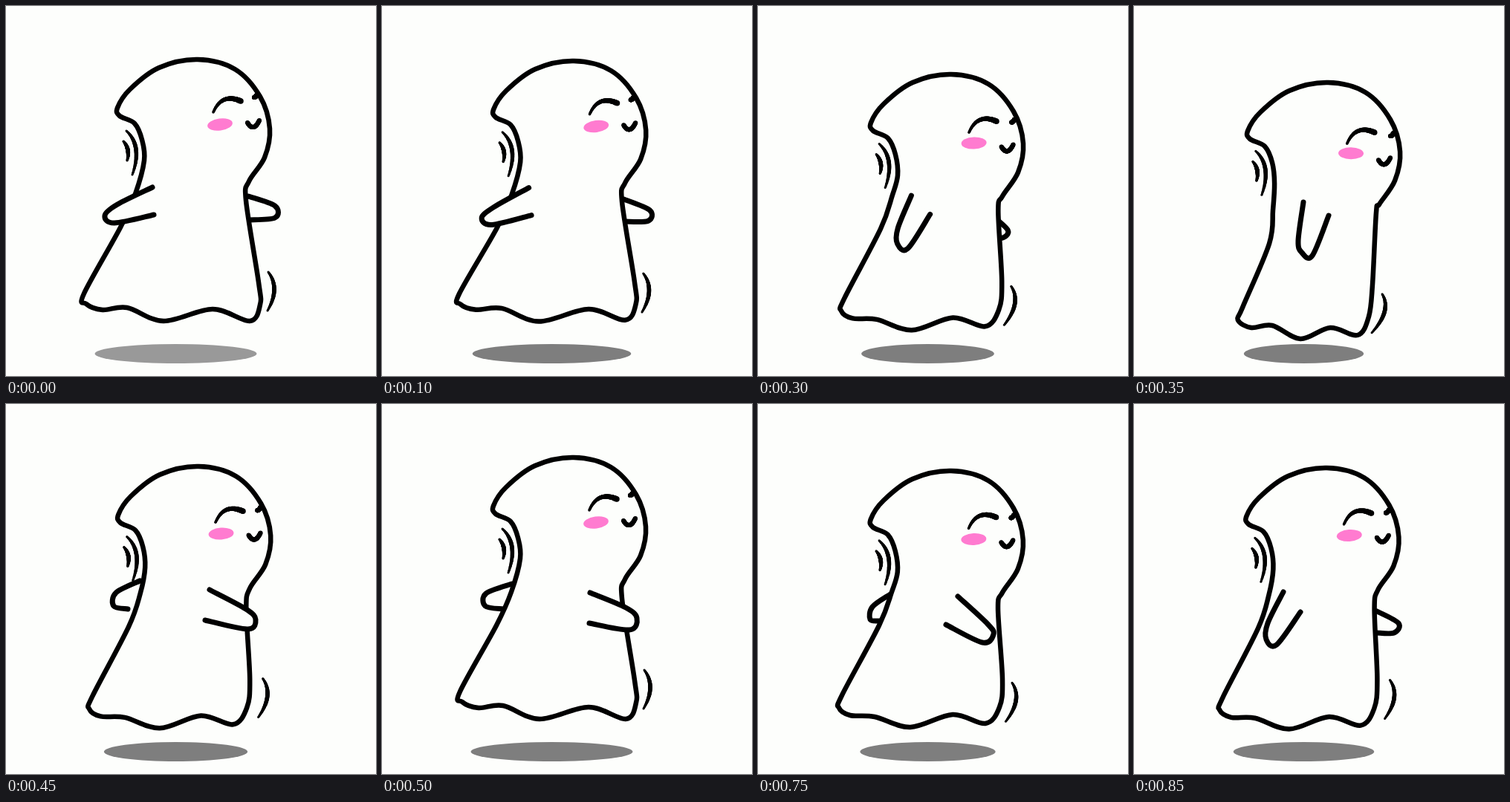
Animation of 498 by 498 pixels, one loop 0.95 s. Source, as an HTML page with a canvas:

```html
<!DOCTYPE html>
<html>
<head>
<meta charset="utf-8">
<title>Walking ghost</title>
<style>
  html, body { margin: 0; width: 100%; height: 100%; overflow: hidden; background: #fdfefc; }
  canvas { display: block; }
</style>
</head>
<body>
<canvas id="stage" width="498" height="498"></canvas>
<script>
const ctx = document.getElementById('stage').getContext('2d');
const PAPER = '#fdfefc', INK = '#000', LOOP = 950;

// Start time, head drop, skirt pose, arm pose, shadow grey
const steps = [
  [0, 0, 0, 0, 153], [50, 2, .3, .3], [150, 6, .8, .7], [200, 9.5, 1.2, 1],
  [300, 20, 2.1, 2.2], [350, 31, 3, 3], [400, 24, 2.7, 3.8], [450, 12, 2.1, 5],
  [500, 0, 0, 6], [600, 3, .5, 5.4], [650, 7, 1, 5, 142], [750, 18, 2, 4],
  [800, 26, 2.7, 3], [850, 14, 2.2, 2]
];

// Outline from the left waist round the head to the neck
const head = [186,208, 183,180, 173,158, 153,148, 150,137, 167,112, 206,83, 258,72,
  308,85, 342,122, 355,165, 348,204, 327,236];

// Outline from the neck round the hem to the left waist, high to low
const skirts = [
  [323,262, 340,372, 342,402, 328,424, 278,408, 212,424,
    163,406, 130,409, 108,401, 105,387, 154,298, 174,253],
  [323,266, 339,365, 341,399, 325,420, 278,408, 209,426,
    157,409, 118,408, 100,402, 102,387, 155,303, 176,256],
  [323,275, 329,370, 325,408, 306,430, 262,418, 205,435,
    157,421, 124,419, 109,409, 113,392, 163,298, 180,253],
  [326,278, 321,375, 316,418, 301,443, 264,433, 224,448,
    186,430, 158,433, 140,423, 146,406, 182,320, 187,275]
];

// The near arm swings from back to front, the far arm the other way
const nearArms = [
  [197,244, 150,267, 133,282, 146,292, 199,281],
  [199,246, 152,279, 137,292, 152,300, 206,283],
  [201,253, 180,295, 178,317, 192,324, 224,280],
  [228,264, 221,316, 226,332, 240,336, 262,282],
  [253,297, 302,321, 317,310, 309,296, 269,259],
  [268,291, 325,303, 336,290, 323,276, 274,250],
  [279,295, 333,304, 343,288, 328,274, 280,254]
];
const farArms = [
  [326,256, 362,269, 362,285, 326,288],
  [326,270, 356,288, 350,299, 326,295],
  [327,279, 356,295, 350,308, 326,308],
  [262,290, 258,330, 235,330, 228,290],
  [163,292, 151,290, 154,273, 178,256],
  [164,276, 145,272, 148,254, 180,238],
  [163,276, 139,272, 140,255, 175,242]
];

function blend(poses, pos) {
  const i = Math.floor(pos), next = poses[Math.min(i + 1, poses.length - 1)];
  return poses[i].map((v, k) => v + (next[k] - v) * (pos - i));
}

// Smooth curve through the points, filled with paper and inked
function curve(flat, width, closed) {
  const n = flat.length / 2;
  const at = i => {
    const k = closed ? (i + n) % n : Math.max(0, Math.min(n - 1, i));
    return [flat[2 * k], flat[2 * k + 1]];
  };
  ctx.beginPath();
  ctx.moveTo(...at(0));
  for (let i = 0; i < (closed ? n : n - 1); i++) {
    const [a, b, c, d] = [at(i - 1), at(i), at(i + 1), at(i + 2)];
    ctx.bezierCurveTo(b[0] + (c[0] - a[0]) / 6, b[1] + (c[1] - a[1]) / 6,
      c[0] - (d[0] - b[0]) / 6, c[1] - (d[1] - b[1]) / 6, c[0], c[1]);
  }
  ctx.fillStyle = PAPER;
  ctx.fill();
  ctx.lineWidth = width;
  ctx.stroke();
}

function ellipse(x, y, rx, ry, color, angle = 0) {
  ctx.fillStyle = color;
  ctx.beginPath();
  ctx.ellipse(x, y, rx, ry, angle, 0, 2 * Math.PI);
  ctx.fill();
}

// Brush stroke through three points; widthAt maps 0..1 to a thickness
function brush([x0, y0, mx, my, x1, y1], widthAt, dx = 0, dy = 0) {
  const cx = 2 * mx - (x0 + x1) / 2, cy = 2 * my - (y0 + y1) / 2;
  for (let u = 0; u <= 1.001; u += 1 / 60) {
    const v = 1 - u, r = widthAt(u) / 2;
    ellipse(v * v * x0 + 2 * u * v * cx + u * u * x1 + dx,
      v * v * y0 + 2 * u * v * cy + u * u * y1 + dy, r, r, INK);
  }
}

const swell = u => 3 + 2.5 * Math.sin(Math.PI * u);
const grow = u => 3.5 + 4 * u;
const even = () => 6;

function draw(time) {
  const [, drop, skirtPos, armPos, grey = 126] = steps.findLast(s => s[0] <= time);
  const top = head.map((v, i) => v + drop * (i % 2 ? 1 : .1));

  ctx.fillStyle = PAPER;
  ctx.fillRect(0, 0, 498, 498);
  ctx.strokeStyle = INK;
  ctx.lineCap = ctx.lineJoin = 'round';

  ellipse(228.5, 468, 109 - 1.1 * drop + .006 * drop ** 2, 13, `rgb(${grey},${grey},${grey})`);
  curve(blend(farArms, armPos), 7);
  curve([...top, ...blend(skirts, skirtPos)], 6.5, true);
  curve(blend(nearArms, armPos), 7);

  brush([162,168, 175,193, 170,227], swell, drop * .06, drop * .88);
  brush([158,182, 164,194, 163,208], swell, drop * .06, drop * .88);
  brush([353 - drop * .61, 358, 361 - drop * .77, 382, 352 - drop * 1.03, 410], swell, 0, drop * .96);

  ellipse(288 + drop * .13, 159.5 + drop * 1.25, 17, 8, '#ff7bd0', -.14 + drop * .005);
  brush([279,143, 294,126, 316,128], grow, drop * .25, drop * 1.36);
  brush([334,123, 336,122, 338,119], even, drop * .36, drop * 1.68);
  brush([325,157, 333,163, 341,154], even, drop * .13, drop * 1.62);
}

const start = performance.now();
function tick() {
  draw((performance.now() - start) % LOOP);
  requestAnimationFrame(tick);
}
tick();
</script>
</body>
</html>
```
